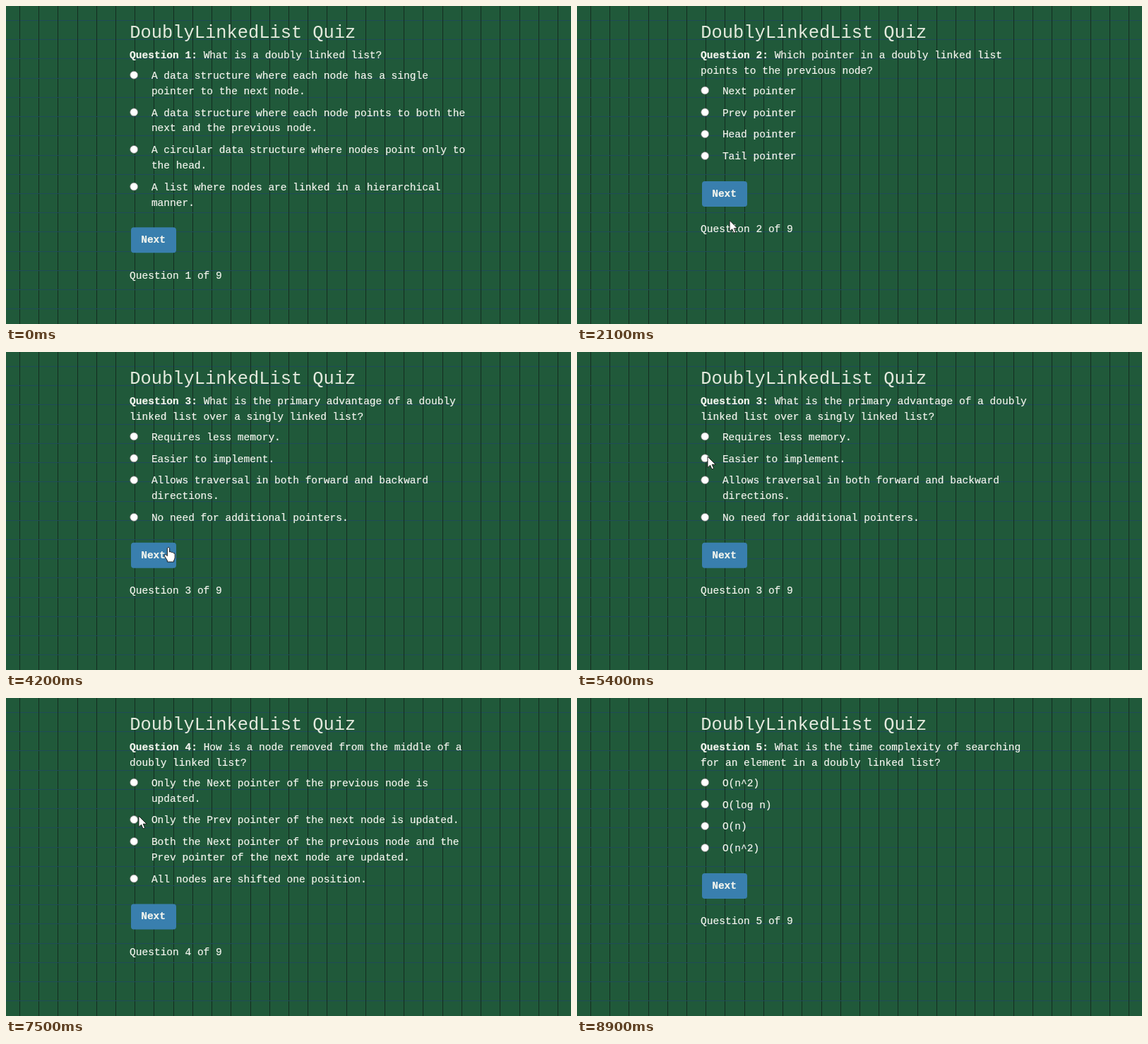
An HTML page that plays this animation: 800 px wide and 450 px high, repeating every 10 s.

```html
<!DOCTYPE html>
<html lang="en">
<head>
<meta charset="utf-8">
<title>DoublyLinkedList Quiz</title>
<style>
  html, body { margin: 0; width: 100%; height: 100%; overflow: hidden; background: #20593a; }
  svg { display: block; width: 800px; height: 450px; }
  text { font: 14.52px "Courier New", "Liberation Mono", monospace; fill: #f3f5ee; stroke: #f3f5ee; stroke-width: .2; white-space: pre; }
  .title { font-size: 25.41px; fill: #e4eade; stroke: none; }
  .bold { font-weight: bold; }
  .radio { fill: #fff; stroke: #767676; stroke-width: .8; }
  .dot { fill: #3b6fdc; visibility: hidden; }
  .checked .radio { stroke: #3b6fdc; stroke-width: 1.3; }
  .checked .dot { visibility: visible; }
  .cursor { fill: #fff; stroke: #111; stroke-width: .9; stroke-linejoin: round; }
</style>
</head>
<body>
<svg viewBox="0 0 800 450">
  <g id="grid"></g>
  <text class="title" x="175.2" y="45">DoublyLinkedList Quiz</text>
  <g id="quiz"></g>
  <path id="arrow" class="cursor" d="M0 0V15.5L3.6 12.2L6 17.8L8.6 16.7L6.2 11.2H11.2Z"/>
  <path id="hand" class="cursor" d="M-1.6 1.5Q0 -1 1.6 1.5V7Q3.2 5.8 4.4 7.6Q6.2 6.8 7 8.5Q9 8 9.2 10.5V15Q8.8 17.5 7.6 19V21H-1.6V19L-5.8 12.5Q-6.2 10 -3.6 10.8L-1.6 12.6Z"/>
</svg>
<script>
const LOOP = 10000, STEP = 100;
const LEFT = 175.1, LINE = 21.78, CELL = 27.22;

// "|" marks a line break
const questions = [
  { start: 0, pick: 1, pickAt: 900, ask: 'What is a doubly linked list?', options: [
    'A data structure where each node has a single|pointer to the next node.',
    'A data structure where each node points to both the|next and the previous node.',
    'A circular data structure where nodes point only to|the head.',
    'A list where nodes are linked in a hierarchical|manner.'] },
  { start: 1800, pick: 1, pickAt: 3300, ask: 'Which pointer in a doubly linked list|points to the previous node?', options: [
    'Next pointer', 'Prev pointer', 'Head pointer', 'Tail pointer'] },
  { start: 4100, pick: 2, pickAt: 6000, ask: 'What is the primary advantage of a doubly|linked list over a singly linked list?', options: [
    'Requires less memory.', 'Easier to implement.',
    'Allows traversal in both forward and backward|directions.',
    'No need for additional pointers.'] },
  { start: 6800, pick: 2, pickAt: 7800, ask: 'How is a node removed from the middle of a|doubly linked list?', options: [
    'Only the Next pointer of the previous node is|updated.',
    'Only the Prev pointer of the next node is updated.',
    'Both the Next pointer of the previous node and the|Prev pointer of the next node are updated.',
    'All nodes are shifted one position.'] },
  { start: 8500, pick: -1, pickAt: LOOP, ask: 'What is the time complexity of searching|for an element in a doubly linked list?', options: [
    'O(n^2)', 'O(log n)', 'O(n)', 'O(n^2)'] }
];

// Pointer stops: time, x, y
const stops = [
  [100, 290, 366], [700, 186, 150], [1000, 184, 151], [1300, 206, 188],
  [1600, 222, 322], [1800, 222, 322], [2200, 215, 300], [2900, 186, 213],
  [3200, 183, 151], [3400, 183, 151], [3900, 230, 276], [4300, 230, 276],
  [5400, 185, 148], [5800, 183, 181], [6100, 183, 181], [6500, 226, 286],
  [6900, 226, 286], [7500, 188, 167], [7700, 183, 202], [7900, 183, 202],
  [8300, 222, 310], [8500, 222, 310], [8900, 198, 368]
];

const byId = id => document.getElementById(id);
const text = (x, y, content, cls = '') => `<text class="${cls}" x="${x}" y="${y}">${content}</text>`;

function drawGrid() {
  let out = '';
  for (let i = 0; i < 30; i++) {
    const x = Math.round(18.87 + i * CELL), y = Math.round(20 + i * CELL);
    out += `<path d="M0 ${y + .5}H800" stroke="#1f4b58"/><path d="M${x + .5} 0V450" stroke="#142d20"/>`;
  }
  byId('grid').innerHTML = out;
}

function drawQuestion(q, index) {
  let y = 74, out = text(LEFT, y, `Question ${index + 1}:`, 'bold');
  q.ask.split('|').forEach((line, i) => {
    out += text(i ? LEFT : LEFT + 12 * 8.714, y, line);
    y += LINE;
  });
  y += 7.2;
  for (const option of q.options) {
    out += `<g class="option"><circle class="radio" cx="181.2" cy="${y - 5.3}" r="5.5"/>
      <circle class="dot" cx="181.2" cy="${y - 5.3}" r="3.5"/>`;
    for (const line of option.split('|')) {
      out += text(205.9, y, line);
      y += LINE;
    }
    out += '</g>';
    y += 9.08;
  }
  q.buttonTop = y - .3;
  out += `<rect x="177" y="${q.buttonTop}" width="64" height="36" rx="4" fill="#397fae"/>`;
  out += text(191.2, q.buttonTop + 22, 'Next', 'bold');
  out += text(LEFT, q.buttonTop + 72.5, `Question ${index + 1} of 9`);
  return `<g>${out}</g>`;
}

function pointerAt(t) {
  const i = stops.findIndex(stop => stop[0] > t);
  if (i < 1) return null;
  const [t0, x0, y0] = stops[i - 1], [t1, x1, y1] = stops[i];
  const p = (t - t0) / (t1 - t0), ease = p * p * (3 - 2 * p);
  return [x0 + (x1 - x0) * ease, y0 + (y1 - y0) * ease];
}

drawGrid();
byId('quiz').innerHTML = questions.map(drawQuestion).join('');
const pages = [...byId('quiz').children];

function render(t) {
  const current = questions.findLastIndex(q => t >= q.start), q = questions[current];
  pages.forEach((page, i) => page.style.display = i === current ? '' : 'none');
  pages[current].querySelectorAll('.option').forEach((option, i) =>
    option.classList.toggle('checked', i === q.pick && t >= q.pickAt));

  const at = pointerAt(t);
  const overButton = at && at[0] > 177 && at[0] < 241 && at[1] > q.buttonTop && at[1] < q.buttonTop + 36;
  for (const [id, shown] of [['arrow', at && !overButton], ['hand', overButton]]) {
    byId(id).style.display = shown ? '' : 'none';
    if (shown) byId(id).setAttribute('transform', `translate(${at})`);
  }
}

const begin = performance.now();
function tick() {
  const t = (performance.now() - begin) % LOOP;
  render(Math.floor(t / STEP) * STEP);
  requestAnimationFrame(tick);
}
tick();
</script>
</body>
</html>
```
